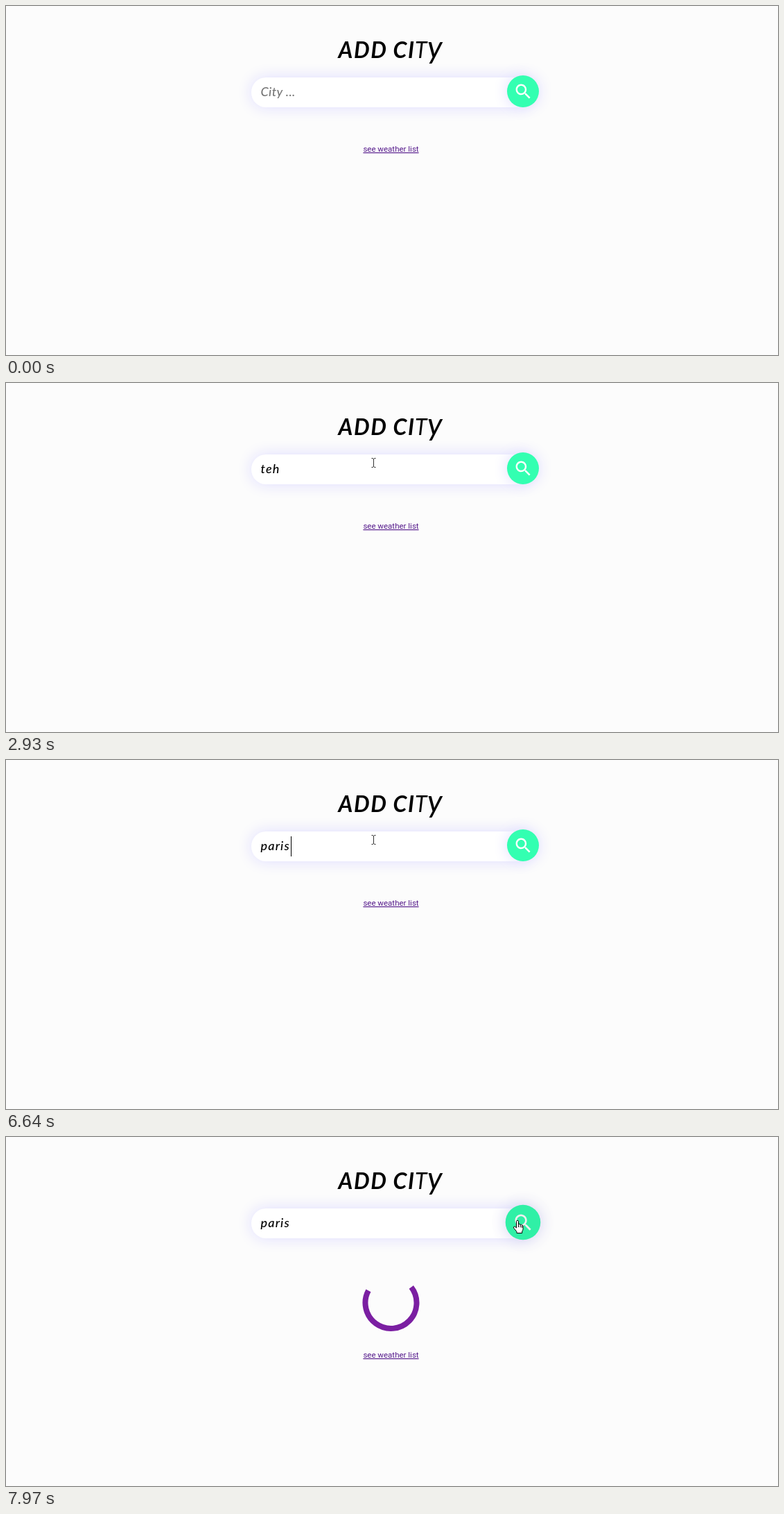
An HTML page for the animation above (8 s loop, 1114 px wide and 503 px high).

```html
<!DOCTYPE html>
<html lang="en">
<head>
<meta charset="utf-8">
<title>Add city</title>
<style>
  html, body { margin: 0; width: 100%; height: 100%; overflow: hidden; background: #fcfcfc; }
  body > * { position: absolute; }
  #bar { left: 354px; top: 103px; width: 403px; height: 43px; border-radius: 21px;
    background: #fff; box-shadow: 0 0 22px #dedcff; }
  #button { left: 723px; top: 100px; width: 46px; height: 46px; border-radius: 50%; background: #33ffb1; }
  #button svg { position: absolute; left: 8.6px; top: 8.6px; width: 28.8px; height: 28.8px; fill: #fff; }
  #stage { left: 0; top: 0; width: 1114px; height: 503px; }
  text { white-space: pre; }
  .script { font-family: Lato, sans-serif; font-style: italic; }
  #title { font-size: 32px; font-weight: 700; letter-spacing: 1.6px; }
  #title .light { font-weight: 400; }
  #field { font-size: 18px; font-weight: 500; letter-spacing: 1.2px; }
  #field.empty { fill: #757575; letter-spacing: .4px; }
  #link { font: 11.5px Roboto, sans-serif; fill: #551a8b; text-decoration: underline; text-anchor: middle; }
</style>
</head>
<body>
<div id="bar"></div>
<div id="button">
  <svg viewBox="0 0 24 24"><path d="M15.5 14h-.79l-.28-.27C15.41 12.59 16 11.11 16 9.5 16 5.91 13.09 3 9.5 3S3 5.91 3 9.5 5.91 16 9.5 16c1.61 0 3.09-.59 4.23-1.57l.27.28v.79l5 4.99L20.49 19l-4.99-5zm-6 0C7.01 14 5 11.99 5 9.5S7.01 5 9.5 5 14 7.01 14 9.5 11.99 14 9.5 14z"/></svg>
</div>
<svg id="stage" viewBox="0 0 1114 503">
  <text id="title" class="script" x="479.5" y="75">ADD <tspan x="558.5">CI</tspan><tspan class="light" x="590">T</tspan><tspan class="light" x="608" font-size="45">y</tspan></text>
  <text id="field" class="script" x="367.5" y="130"></text>
  <rect id="caret" y="110" width="1" height="29"/>
  <path id="spinner" fill="none" stroke="#7b1fa2" stroke-width="8"/>
  <text id="link" x="555.5">see weather list</text>
  <circle id="halo" r="10" fill="#ff0" fill-opacity=".5"/>
  <g id="pointer" stroke="#000" fill="#fff" stroke-linejoin="round">
    <path id="arrow" d="M.5 .5V14.5L3.7 11.5 6 16.8 8.3 15.8 6 10.6H10.5Z"/>
    <path id="beam" fill="none" stroke="#333" d="M-2.5-6.5H-1L.5-5.5 2-6.5H3.5M.5-5.5V5.5M-2.5 6.5H-1L.5 5.5 2 6.5H3.5"/>
    <path id="hand" d="M-1.5 11V1.5Q-1.5 .3 0 .3T1.5 1.5V6.5Q1.7 5.3 2.9 5.4T4.2 6.8Q4.4 6 5.4 6.1T6.6 7.4Q7.8 6.6 8.1 8.2V12.5Q8 14.5 6.7 16V18.5H-1V16.5L-5.3 11.2Q-6 9.6-4.7 9-3.4 8.7-1.5 11ZM1.5 6.5V10M4.2 7V10.4M6.6 7.8V10.8"/>
  </g>
</svg>
<script>
const LOOP = 8000;
const $ = id => document.getElementById(id);
const set = (id, attrs) => Object.entries(attrs).forEach(([k, v]) => $(id).setAttribute(k, v));
const show = (id, on) => { $(id).style.display = on ? '' : 'none'; };
const clamp = v => Math.max(0, Math.min(1, v));
const mix = (a, b, p) => a + (b - a) * p;
const ease = p => p * p * (3 - 2 * p);
const ramp = (t, start, span) => ease(clamp((t - start) / span));

// start time, field value, caret x (0 = hidden)
const typing = [
  [0, '', 0], [1290, '', 367], [1840, '', 0],
  [2140, 't', 374], [2390, 'te', 383], [2530, 'teh', 394], [2930, 'teh', 0], [3490, 'teh', 394],
  [3770, 'te', 383], [3930, 't', 374], [4160, '', 367], [4560, '', 0],
  [4730, 'p', 378], [4880, 'pa', 389], [5020, 'par', 396], [5100, 'par', 0], [5570, 'par', 396],
  [5970, 'pari', 402], [6030, 'paris', 411], [6210, 'paris', 0], [6640, 'paris', 411], [7130, 'paris', 0]
];

// start time, step length, steps, from, to
const moves = [
  [210, 75, 2, [832, 414], [737, 381]],
  [600, 76.6, 6, [737, 381], [530, 115]],
  [6800, 66, 5, [530, 115], [738, 120]]
];

function pointerAt(t) {
  const move = moves.findLast(m => t >= m[0]);
  if (!move) return null;
  const [start, step, count, from, to] = move;
  const first = start === 210 ? 0 : 1;
  const p = ease(clamp((Math.floor((t - start) / step) + first) / (count + first)));
  return from.map((v, i) => mix(v, to[i], p));
}

function drawPointer(t) {
  const at = pointerAt(t);
  const clickField = t >= 1290 && t < 1530, clickButton = t >= 7480 && t < 7680;
  show('pointer', at);
  show('halo', clickField || clickButton);
  if (!at) return;
  const [x, y] = at.map(Math.round);
  const inBar = y > 103 && y < 146;
  set('pointer', { transform: `translate(${x} ${y})` });
  set('halo', { cx: x - 2, cy: clickField ? y - 1 : y });
  show('arrow', !inBar);
  show('beam', inBar && x < 723);
  show('hand', inBar && x >= 723);
}

function drawField(t) {
  const [, value, caret] = typing.findLast(s => t >= s[0]);
  $('field').textContent = value || 'City ...';
  $('field').classList.toggle('empty', !value);
  set('caret', { x: caret });
  show('caret', caret);
}

function drawButton(t) {
  const hover = ramp(t, 7210, 200);
  const press = ramp(t, 7450, 130) - ramp(t, 7680, 260);
  const style = $('button').style;
  style.transform = `scale(${mix(1, 1.1, hover)})`;
  style.filter = `brightness(${1 - .06 * hover - .04 * press})`;
  style.boxShadow = `0 0 22px rgba(222,220,255,${1 - press}), 0 4px 10px rgba(0,0,0,${.42 * press})`;
}

function drawSpinner(t) {
  const loading = t >= 7680;
  show('spinner', loading);
  set('link', { y: loading ? 318 : 210 });
  const start = -38 + (t - 7970) * .36;
  const point = deg => {
    const a = deg * Math.PI / 180;
    return `${555.5 + 37 * Math.cos(a)} ${239 + 37 * Math.sin(a)}`;
  };
  set('spinner', { d: `M${point(start)}A37 37 0 1 1 ${point(start + 246)}` });
}

function frame() {
  const t = performance.now() % LOOP;
  drawPointer(t);
  drawField(t);
  drawButton(t);
  drawSpinner(t);
  requestAnimationFrame(frame);
}
frame();
</script>
</body>
</html>
```
